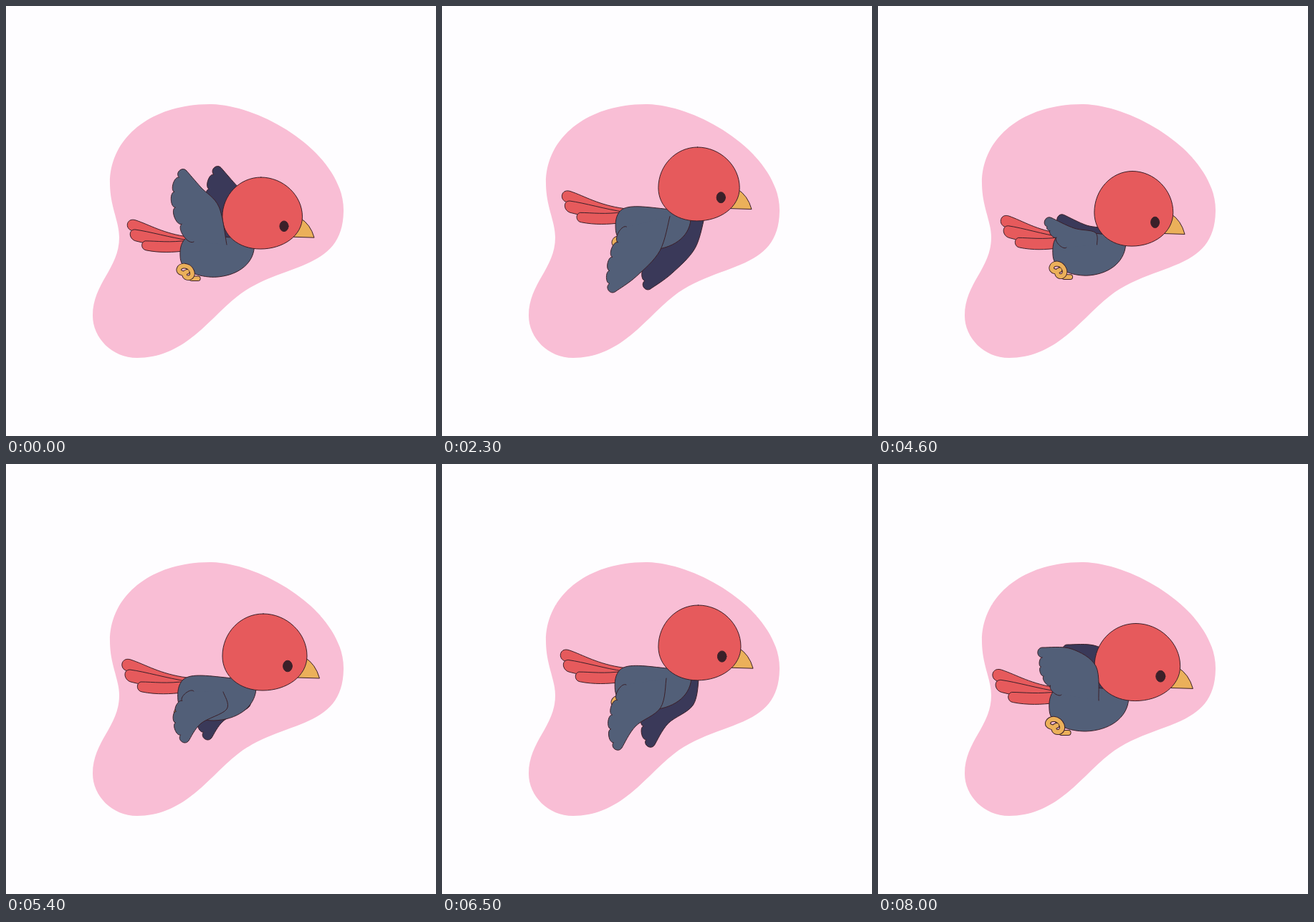
Animation, 600 px wide and 600 px high, one loop 8100 ms. Source, as an HTML page:

```html
<!DOCTYPE html>
<html lang="en">
<head>
<meta charset="utf-8">
<title>Flying bird</title>
<style>
html, body { margin: 0; width: 100%; height: 100%; overflow: hidden; background: #fefdff; }
svg { display: block; width: 100vw; height: 100vh; }
.ink { stroke: #3b2029; stroke-width: 1; stroke-linejoin: round; stroke-linecap: round; }
.ink * { vector-effect: non-scaling-stroke; }
.red { fill: #e65a5c; }
.blue { fill: #525f78; }
.navy { fill: #3a3959; }
.gold { fill: #ebb05a; }
.toe { fill: none; stroke: #ebb05a; stroke-width: 6; }
.toe.edge { stroke: #3b2029; stroke-width: 8; }
</style>
</head>
<body>
<svg viewBox="0 0 600 600">
  <defs>
    <path id="toe" d="M257 360L266 360"/>
    <path id="claw" d="M243 352C234 350 238 341 246 341C257 342 262 356 253 359C245 360 244 351 250 350"/>
  </defs>
  <path fill="#f9bed5" d="M287 137C360 139 472 208 471 286C470 372 384 357 323 405C284 435 250 491 183 491C148 491 121 463 121 432C121 387 158 366 158 323C158 300 145 280 145 247C145 182 205 136 287 137"/>
  <g class="ink">
    <g class="rig red">
      <path d="M252 298C215 293 195 280 174 273C161 269 158 284 167 288C190 297 220 304 250 306"/>
      <path d="M252 303C225 299 195 290 173 287C163 287 164 301 174 304C200 311 225 312 248 313"/>
      <path d="M252 303C225 307 205 304 188 304C181 306 182 317 190 318C210 322 230 321 246 319"/>
    </g>
    <path id="far" class="navy"/>
    <g class="rig">
      <path class="blue" d="M316 299C285 296 258 291 247 301C240 308 239 318 240 330C242 350 268 358 290 358C322 357 347 340 349 314L340 280"/>
      <use href="#toe" class="toe edge"/>
      <use href="#toe" class="toe"/>
      <use href="#claw" class="toe edge"/>
      <use href="#claw" class="toe"/>
      <path class="gold" d="M417 270Q432 279 437.5 299L405 298Z"/>
      <path class="red" d="M359 209C392 209 420 236 420 268C420 296 392 316 358 316C326 316 302 296 302 268C302 236 327 209 359 209Z"/>
      <ellipse cx="393" cy="282" rx="6.4" ry="7.8" fill="#3b2029"/>
    </g>
    <path id="near" class="blue"/>
  </g>
</svg>
<script>
const $ = id => document.getElementById(id);
const rigs = document.querySelectorAll('.rig');

const lerp = (a, b, t) => Array.isArray(a) ? a.map((v, i) => lerp(v, b[i], t)) : a + (b - a) * t;

// Key pose: [x scale, head top, y scale], then shoulder, elbow, wrist, tip, trailing bend, root
const up     = [[.946, 239, .935],  [308, 333], [297, 280], [272, 253], [252, 230], [221, 278], [262, 329]];
const folded = [[.917, 222, 1.02],  [303, 333], [309, 352], [275, 367], [232, 361], [240, 330], [264, 345]];
const sweep  = [[.97, 209, .963],   [313, 307], [306, 345], [275, 384], [237, 391], [228, 345], [263, 317]];
const down   = [[.975, 197, .98],   [313, 299], [305, 340], [270, 366], [251, 396], [227, 352], [257, 308]];
const lift   = [[1, 209, 1],        [303, 318], [308, 342], [272, 362], [255, 386], [222, 343], [262, 317]];
const raise  = [[1.014, 222.5, 1.01], [308, 330], [304, 282], [270, 258], [230, 256], [220, 296], [256, 322]];
const low = lerp(lift, down, 2);

const between = (a, b, n) => Array.from({ length: n }, (_, i) => lerp(a, b, i / n));
const flap = [...between(up, folded, 4), folded, ...between(sweep, low, 2), ...between(low, down, 2), down, lift, raise];

// Flick back and forth, settling on the last pose at tick end
function flick(tick, end, last) {
  const left = Math.max(0, end - tick);
  return last - left % 2 * Math.ceil((left + 3) / 4);
}

const play = (tick, start, end, first) => (Math.min(tick, end) - start + first) % flap.length;

// Pose number for a tick of 100 ms
function poseAt(tick) {
  if (tick < 17) return flick(tick, 13, 4);
  if (tick < 23) return flick(tick, 20, 5);
  if (tick < 38) return flick(tick, 34, 10);
  if (tick < 43) return play(tick, 38, 40, 11);
  if (tick < 74) return play(tick, 43, 72, 11);
  return play(tick, 74, 80, 5);
}

// Smooth open curve through points
function spline(p) {
  const at = i => p[Math.max(0, Math.min(p.length - 1, i))];
  let d = 'M' + p[0];
  for (let i = 0; i < p.length - 1; i++) {
    const [a, b, c, e] = [at(i - 1), at(i), at(i + 1), at(i + 2)];
    const c1 = b.map((v, j) => v + (c[j] - a[j]) / 6);
    const c2 = c.map((v, j) => v - (e[j] - b[j]) / 6);
    d += `C${c1} ${c2} ${c}`;
  }
  return d;
}

// Rounded feather end from a to b
function feather(a, b, bulge) {
  const nx = (a[1] - b[1]) * bulge, ny = (b[0] - a[0]) * bulge;
  return `C${a[0] + nx} ${a[1] + ny} ${b[0] + nx} ${b[1] + ny} ${b}`;
}

function wing([shoulder, elbow, wrist, tip, bend, root]) {
  const cross = (tip[0] - shoulder[0]) * (bend[1] - shoulder[1]) - (tip[1] - shoulder[1]) * (bend[0] - shoulder[0]);
  const side = cross < 0 ? 1 : -1;
  const dx = tip[0] - wrist[0], dy = tip[1] - wrist[1];
  const width = 14 * side / Math.hypot(dx, dy);
  const inner = [tip[0] + dy * width, tip[1] - dx * width];

  let d = spline([shoulder, elbow, wrist, tip]) + feather(tip, inner, .65 * side);
  const count = 4;
  let from = inner;
  for (let i = 1; i <= count; i++) {
    const t = i / count;
    const to = lerp(lerp(inner, bend, t), lerp(bend, root, t), t);
    d += feather(from, to, .33 * side);
    from = to;
  }
  return d;
}

function draw(time) {
  const [[sx, top, sy], ...points] = flap[poseAt(Math.floor(time % 8100 / 100))];
  const place = `translate(300 ${top}) scale(${sx} ${sy}) translate(-300 -209)`;
  rigs.forEach(g => g.setAttribute('transform', place));

  // The far wing shows more the further the wings are from level
  const [shoulder, , , tip] = points;
  const shift = .47 * Math.abs(tip[1] - shoulder[1]);
  const shape = wing(points);
  $('near').setAttribute('d', shape);
  $('far').setAttribute('d', shape);
  $('far').setAttribute('transform', `translate(${shift} -4)`);
}

const begin = performance.now();
function loop() {
  draw(performance.now() - begin);
  requestAnimationFrame(loop);
}
loop();
</script>
</body>
</html>
```
